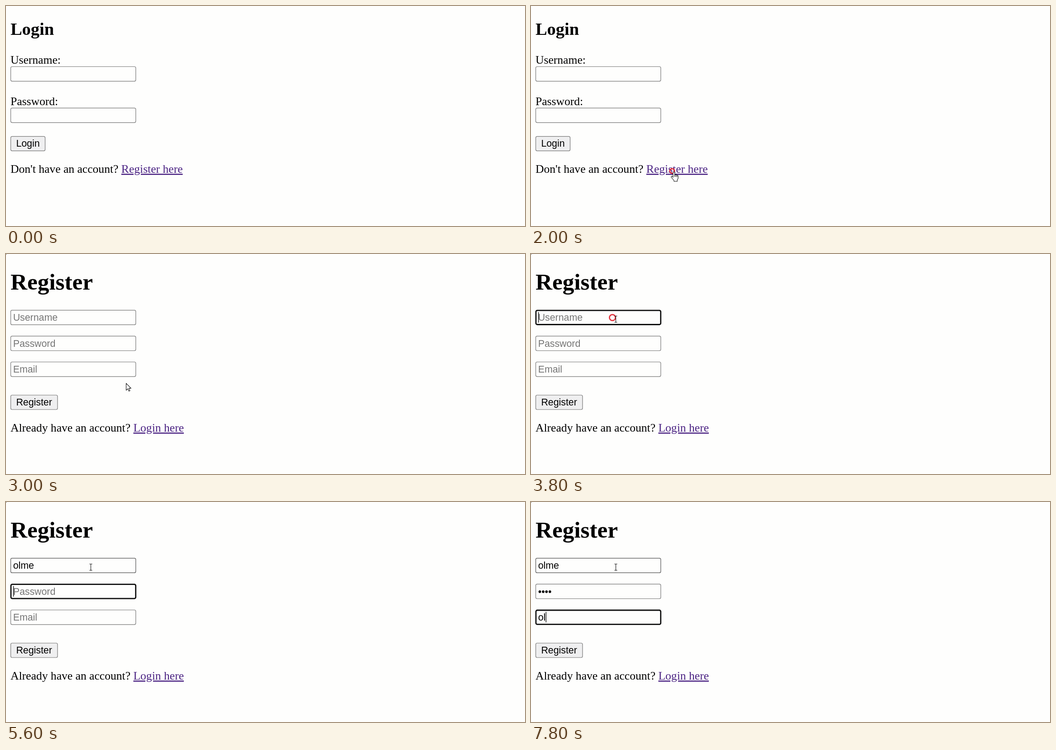
Animation of 1147x488 px, one loop 8000 ms. Source, as an HTML page:

```html
<!DOCTYPE html>
<html lang="en">
<head>
<meta charset="utf-8">
<title>Login and register</title>
<style>
html, body { margin: 0; width: 100%; height: 100%; overflow: hidden; background: #fefefd; }
svg { display: block; font: 25.6px "Liberation Serif", "Times New Roman", serif; }
.ui { font: 21.33px "Liberation Sans", Arial, sans-serif; }
.hint { fill: #757575; }
.link { fill: #4b2383; text-decoration: underline; }
.pointer { fill: #fff; stroke: #111; stroke-width: 1.1; stroke-linejoin: round; }
</style>
</head>
<body>
<svg id="stage" width="1147" height="488" viewBox="0 0 1147 488"></svg>
<script>
const LOOP = 8000, STEP = 200, PAGE_SWITCH = 2200;
const stage = document.getElementById('stage');

// Pointer stops: time, x, y
const path = [[200, 316, 46], [1200, 303, 357], [1800, 312, 366], [2600, 312, 366], [3600, 180, 141]];
const clicks = [[1945, 312, 366], [3690, 180, 141]];

const loginFields = [{ y: 134.5 }, { y: 226.3 }];
const registerFields = [
  { y: 124.6, hint: 'Username', value: 'olme', focus: 3800, blur: 5400, keys: [4400, 4600, 4800, 5000] },
  { y: 182.2, hint: 'Password', value: '••••', focus: 5400, blur: 7000, keys: [5800, 6000, 6400, 6600] },
  { y: 239.5, hint: 'Email', value: 'ol', focus: 7000, blur: LOOP, keys: [7600, 7800] }
];

// Advance widths in em, used to place the caret
const advance = { o: .556, l: .222, m: .833, e: .556, '•': .35 };

const inside = (p, x0, y0, x1, y1) => p && p.x >= x0 && p.x <= x1 && p.y >= y0 && p.y <= y1;
const overField = (p, f) => inside(p, 10, f.y, 288, f.y + 33);

const text = (x, y, s, attrs = '') => `<text x="${x}" y="${y}" ${attrs}>${s}</text>`;
const heading = (y, size, s) => text(10, y, s, `font-weight="bold" font-size="${size}"`);
const box = (x, y, w, h, fill, stroke, width = 1.2) =>
  `<rect x="${x}" y="${y}" width="${w}" height="${h}" rx="3" fill="${fill}" stroke="${stroke}" stroke-width="${width}"/>`;
const button = (y, w, s) =>
  box(10.5, y, w, 32, '#efeff0', '#767676') + text(22.4, y + 22.8, s, 'class="ui"');
const footer = (y, question, link) =>
  text(10, y, `${question} <tspan class="link">${link}</tspan>`);

function pointerAt(t) {
  if (t < path[0][0]) return null;
  const i = path.findIndex(k => k[0] > t);
  if (i < 0) return { x: path.at(-1)[1], y: path.at(-1)[2] };
  const [t0, x0, y0] = path[i - 1], [t1, x1, y1] = path[i];
  const u = (t - t0) / (t1 - t0), e = u * u * (3 - 2 * u);
  return { x: x0 + (x1 - x0) * e, y: y0 + (y1 - y0) * e };
}

function field(f, t, p) {
  const focused = t >= f.focus && t < f.blur;
  const mid = f.y + 16.2;
  let out = focused
    ? box(10.9, f.y + .5, 275.8, 31.4, '#fefefd', '#101010', 2.8)
    : box(10.5, f.y, 276.3, 32.3, '#fefefd', overField(p, f) ? '#505050' : '#767676');
  if (!f.hint) return out;
  const typed = f.value.slice(0, f.keys.filter(k => k <= t).length);
  out += text(15.7, mid + 7.4, typed || f.hint, `class="ui${typed ? '' : ' hint'}"`);
  if (focused) {
    const x = 16 + 21.33 * [...typed].reduce((sum, c) => sum + advance[c], 0);
    out += `<rect x="${x}" y="${mid - 12}" width="1.3" height="23.5"/>`;
  }
  return out;
}

const loginPage = (t, p) =>
  heading(64, 38.4, 'Login') +
  text(10, 128, 'Username:') + text(10, 219.6, 'Password:') +
  loginFields.map(f => field(f, t, p)).join('') +
  button(289.3, 76, 'Login') +
  footer(370, "Don't have an account?", 'Register here');

const registerPage = (t, p) =>
  '<rect width="1" height="1"/>' +
  heading(79, 51.2, 'Register') +
  registerFields.map(f => field(f, t, p)).join('') +
  button(313, 103.4, 'Register') +
  footer(394, 'Already have an account?', 'Login here');

function ring([start, x, y], t) {
  const age = t - start;
  if (age < 0 || age > 960) return '';
  return `<circle cx="${x}" cy="${y}" r="${3.6 + age * .0275}" fill="none" stroke="#e0202c"
    stroke-width="2.8" opacity="${1 - age / 1000}"/>`;
}

function pointer(p, fields, overLink) {
  if (!p) return '';
  const draw = (dx, dy, d) =>
    `<path class="pointer" transform="translate(${p.x + dx} ${p.y + dy})" d="${d}"/>`;
  if (fields.some(f => overField(p, f)))
    return draw(7.5, 3.5, 'M-3-7h2q1 0 1 1q0-1 1-1h2M0-6V6M-3 7h2q1 0 1-1q0 1 1 1h2');
  if (overLink)
    return draw(0, 0, 'M2 14V4a1.8 1.8 0 0 1 3.6 0v5a1.5 1.5 0 0 1 2.6 0a1.5 1.5 0 0 1 2.6 1' +
      'a1.4 1.4 0 0 1 2.4 1v5l-2 4v3H4v-2l-6-7a1.6 1.6 0 0 1 2.4-2zM5.6 9v4M8.2 10v3M10.8 10.5v3');
  return draw(0, 0, 'M0 0V15.5l3.6-3.4 2.5 5.4 2.3-1-2.4-5.4h4.8z');
}

function render(t) {
  const p = pointerAt(t), onLogin = t < PAGE_SWITCH;
  const overLink = onLogin ? inside(p, 255, 345, 391, 378) : inside(p, 282, 372, 393, 402);
  stage.innerHTML = (onLogin ? loginPage : registerPage)(t, p) +
    clicks.map(c => ring(c, t)).join('') +
    pointer(p, onLogin ? loginFields : registerFields, overLink);
}

let shown = -1;
function tick() {
  const t = Math.floor(performance.now() % LOOP / STEP) * STEP;
  if (t !== shown) render(shown = t);
  requestAnimationFrame(tick);
}
tick();
</script>
</body>
</html>
```
